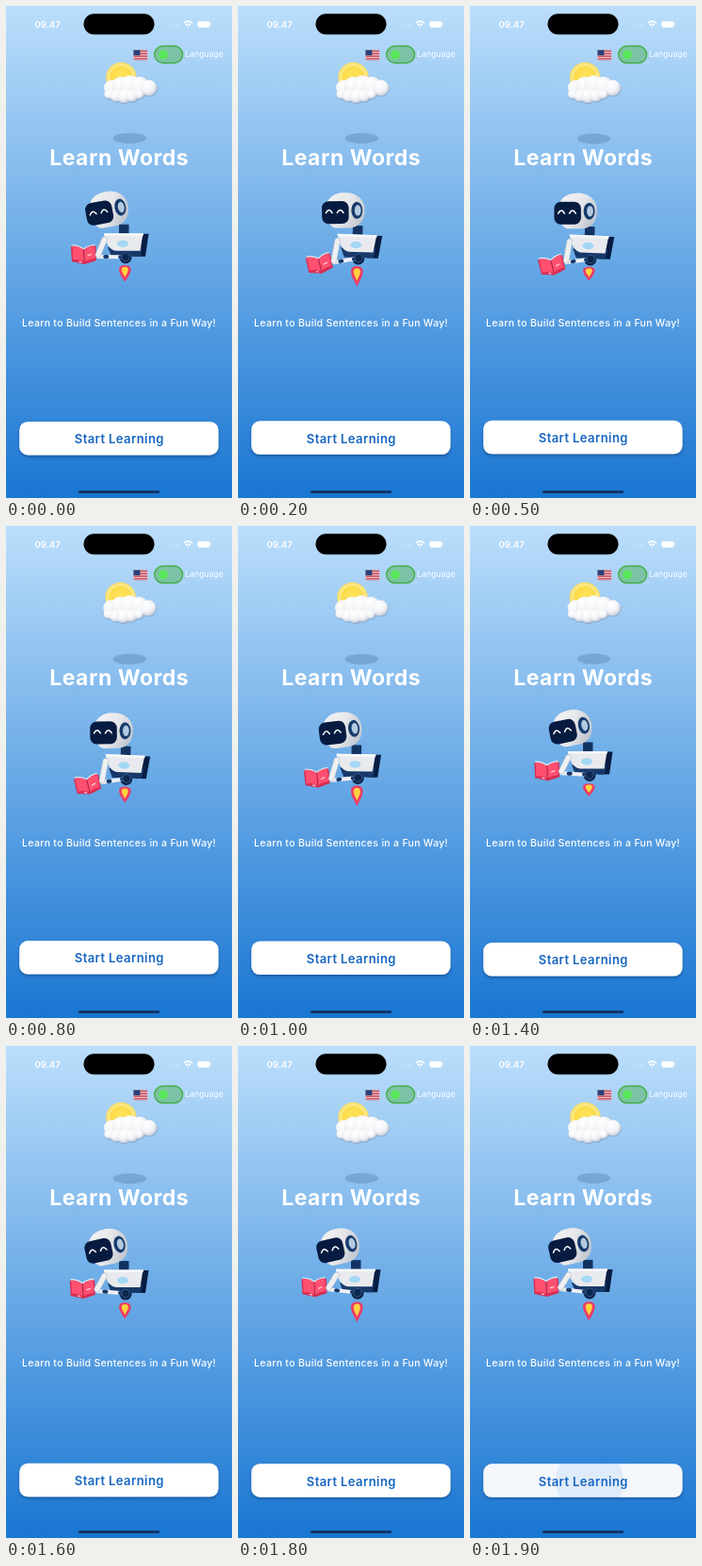
Animation, 240 px wide and 522 px high, one loop 2000 ms. Source, as an HTML page:

```html
<!DOCTYPE html>
<html lang="en">
<head>
<meta charset="utf-8">
<title>Learn Words</title>
<style>
html, body { margin: 0; width: 100%; height: 100%; overflow: hidden; background: #6aaae6; }
svg { display: block; width: 100vw; height: 100vh; }
text { font-family: Inter, Roboto, sans-serif; fill: #fff; }
.mid { text-anchor: middle; }
</style>
</head>
<body>
<svg viewBox="0 0 240 522" preserveAspectRatio="none">
  <defs>
    <linearGradient id="sky" x2="0" y2="1">
      <stop stop-color="#bbdefb"/><stop offset="1" stop-color="#1976d2"/>
    </linearGradient>
    <radialGradient id="sunFill">
      <stop stop-color="#ffe35c"/><stop offset=".72" stop-color="#fbdc4a"/>
      <stop offset=".8" stop-color="#fdea8c"/><stop offset="1" stop-color="#f8dc62"/>
    </radialGradient>
    <radialGradient id="puff" cx=".4" cy=".3" r=".78">
      <stop stop-color="#fff"/><stop offset=".55" stop-color="#f3f4f7"/><stop offset="1" stop-color="#b9c0cc"/>
    </radialGradient>
    <linearGradient id="shell" x2="1" y2=".5">
      <stop stop-color="#f4f4f4"/><stop offset=".6" stop-color="#e6e7ea"/><stop offset="1" stop-color="#c3c8d0"/>
    </linearGradient>
    <clipPath id="btnClip"><rect x="14.2" y="441" width="211.4" height="35.5" rx="9"/></clipPath>
    <filter id="soft" x="-10%" y="-40%" width="120%" height="200%">
      <feDropShadow dx="0" dy="1.8" stdDeviation="1.4" flood-color="#06264f" flood-opacity=".42"/>
    </filter>
    <filter id="cloudShade" x="-20%" y="-20%" width="140%" height="150%">
      <feDropShadow dx=".4" dy=".8" stdDeviation=".6" flood-color="#345b88" flood-opacity=".4"/>
    </filter>
  </defs>
  <rect width="240" height="522" fill="url(#sky)"/>

  <!-- Status bar -->
  <text x="30.5" y="23" font-size="9.6" font-weight="600">09.47</text>
  <rect x="82.5" y="8.3" width="75" height="22" rx="11"/>
  <path d="M174.5 21h11" stroke="#fff" stroke-width="1.3" stroke-dasharray="1.3 1.8" opacity=".5"/>
  <g fill="none" stroke="#fff" stroke-width="1.5">
    <path d="M188.6 18.2q4.6-3.8 9.2 0M190.4 20.3q2.8-2.2 5.6 0"/>
    <circle cx="193.2" cy="22" r=".5" stroke-width=".8"/>
  </g>
  <rect x="203.5" y="16.2" width="13" height="6.6" rx="2" fill="#fff"/>
  <rect x="217" y="18.3" width="1.1" height="2.4" rx=".5" fill="#fff" opacity=".7"/>

  <!-- Language switch -->
  <g id="flag"></g>
  <rect x="157.7" y="42.5" width="30" height="18" rx="9" fill="#4caf50" fill-opacity=".48" stroke="#42ad42" stroke-width="1.4"/>
  <circle cx="167" cy="51.6" r="5.2" fill="#5ae65c"/>
  <text x="190.5" y="54.4" font-size="8.3" letter-spacing=".18">Language</text>

  <!-- Weather -->
  <g id="weather">
    <circle cx="122" cy="76" r="16.2" fill="url(#sunFill)"/>
    <g id="cloud" fill="url(#puff)" filter="url(#cloudShade)"></g>
  </g>
  <ellipse id="shade" cx="131.3" rx="17.5" ry="5.6" fill="#3d6890" opacity=".3"/>

  <text class="mid" x="120.2" y="169.2" font-size="23" font-weight="700" letter-spacing=".5">Learn Words</text>

  <!-- Robot -->
  <g id="flame">
    <path d="M0 22C-2.4 17-6.3 11-6.3 5.5C-6.3-1.8 6.3-1.8 6.3 5.5C6.3 11 2.4 17 0 22Z" fill="#ef3b64"/>
    <path d="M0 16C-1.5 12.5-3.6 9-3.6 5.7C-3.6 1 3.6 1 3.6 5.7C3.6 9 1.5 12.5 0 16Z" fill="#ffd23f"/>
  </g>
  <g id="body">
    <rect x="120" y="231" width="10.5" height="12" fill="#123362"/>
    <path d="M138 241H151.5L148 265H136Z" fill="#071d42"/>
    <circle cx="127" cy="266" r="6.5" fill="#0b2348"/>
    <path d="M108 255H145L143 265H112Z" fill="#17396a"/>
    <path d="M104 240.5H145.5L142.5 259H117Q107 258 104 240.5Z" fill="#e9eaed"/>
    <path d="M104 240.5H146L145.7 243H104.4Z" fill="#f7f8fa"/>
    <ellipse cx="124" cy="251.5" rx="6" ry="3.7" fill="#a4d8f4"/>
  </g>
  <g id="head">
    <path d="M-17-9C-13-17-5-19 0-19C13-20 23-12 23-1C23 11 16 18.5 6 18.5H-8C-17 18-19 1-17-9Z" fill="url(#shell)"/>
    <rect x="-22.7" y="-10" width="28.5" height="24" rx="7" fill="#071b40"/>
    <path d="M-18.5 2.4q3.4-6 6.8 0M-6.6 2.4q3.4-6 6.8 0" fill="none" stroke="#fff" stroke-width="1.5" stroke-linecap="round"/>
    <ellipse cx="14.5" cy="0" rx="6" ry="9" fill="#173b6c"/>
    <ellipse cx="15.4" cy="0" rx="3.4" ry="5.8" fill="#b4c9df"/>
  </g>
  <g id="book">
    <path d="M-13.5-8L0-4.5L13-8.5L13.5 7L1 11L-12.5 8Z" fill="#d92d52"/>
    <path d="M-12-9Q-5-9 0-5Q5-9 11.5-9.5L12.3 5Q5 5.5 .8 8.8Q-4 5.5-11.4 6Z" fill="#ff5070"/>
    <path d="M-12.5-9.3Q-5-9.3 0-5.4Q5-9.3 12-9.8" fill="none" stroke="#d5f0f5" stroke-width="1.1"/>
    <path d="M0-5L.8 9" stroke="#a71f45"/>
    <path d="M4 2l4.5-1.6M-5 8l3 .8" stroke="#ffd0d8" stroke-width="1.2"/>
  </g>
  <g fill="none" stroke-linecap="round" stroke-linejoin="round">
    <path id="forearm" stroke="#eef0f3" stroke-width="4"/>
    <path id="cuff" stroke="#17396a" stroke-width="4"/>
    <path id="armEdge" stroke="#b3bcc9" stroke-width="6.4"/>
    <path id="arm" stroke="#eeeff1" stroke-width="5.2"/>
  </g>
  <circle id="elbow" r="4.3" fill="#0d274f" stroke="#34598a"/>

  <text class="mid" x="120.1" y="340.2" font-size="10.5" font-weight="500" letter-spacing=".3">Learn to Build Sentences in a Fun Way!</text>

  <!-- Button -->
  <g id="button">
    <rect x="14.2" y="441" width="211.4" height="35.5" rx="9" fill="#fff" filter="url(#soft)"/>
    <g id="press" clip-path="url(#btnClip)" fill="#1565c0">
      <rect x="14" y="441" width="212" height="36" opacity=".045"/>
      <circle id="ripple" cx="127" cy="459" opacity=".09"/>
    </g>
    <text class="mid" x="120.3" y="464.3" font-size="13" font-weight="600" letter-spacing=".42" style="fill:#1565c0">Start Learning</text>
  </g>
  <rect x="77" y="514.2" width="86" height="2.6" rx="1.3" fill="#122c56"/>
</svg>
<script>
const LOOP = 2000, STEP = 100, TAP = 1800;
const $ = id => document.getElementById(id);
const wave = (t, peak, period) => Math.cos(2 * Math.PI * (t - peak) / period);

function smoothstep(a, b, x) {
  const k = Math.min(1, Math.max(0, (x - a) / (b - a)));
  return k * k * (3 - 2 * k);
}

function set(id, attrs) {
  for (const name in attrs) $(id).setAttribute(name, attrs[name]);
}
const place = (id, x, y, extra = "") => set(id, { transform: `translate(${x} ${y}) ${extra}` });

function buildScene() {
  // Two rows of puffs, fullest in the middle
  let cloud = "";
  const row = (x, gap, y, rise, r, grow) => {
    for (let i = 0; i < 5; i++) {
      const s = Math.sin(i * Math.PI / 4);
      cloud += `<circle cx="${x + i * gap}" cy="${y + rise * s}" r="${r + grow * s}"/>`;
    }
  };
  row(112, 9.8, 87, -3, 8.5, 2);
  row(109, 8, 93.5, 2, 5, 2.4);
  $("cloud").innerHTML = cloud;

  let flag = `<rect x="135.5" y="46.8" width="14.7" height="10.4" rx=".7" fill="#f6f0f2"/>`;
  for (let i = 0; i < 7; i++) flag += `<rect x="135.5" y="${46.8 + i * 1.6}" width="14.7" height=".9" fill="#c22f40"/>`;
  $("flag").innerHTML = flag + `<rect x="135.5" y="46.8" width="7" height="5.6" fill="#2b4178"/>`;
}

function draw(t) {
  const bob = wave(t, 550, 2900);           // whole robot, 1 = lowest
  const nod = smoothstep(.45, .75, bob);    // 1 = looking straight, book lowered

  place("weather", .5 * wave(t, 200, 1600), 0);
  set("shade", { cy: 140.8 - .5 * wave(t, 0, LOOP) });

  const dx = 1.2 * nod, dy = 3.6 * bob - .6;
  place("body", dx, dy, `rotate(${2.2 * nod} 127 255)`);
  place("head", 106.8 + .8 * bob + 4.5 * nod, 215.2 + 2.5 * bob, `rotate(${2 * bob + 9 * nod - 11})`);
  place("flame", 126.3, 274 + 2.8 * bob, `scale(1 ${(17.5 + 4 * wave(t, 200, 800)) / 22})`);

  const bx = 82 + 1.2 * bob + 3.5 * nod, by = 260.8 + 6 * bob + 8 * nod;
  place("book", bx, by, `rotate(${-10 * nod})`);

  const hx = bx + 15.5, hy = Math.min(by + 1, 270);
  const ex = 127 + dx, ey = 265.5 + dy;
  const at = k => `${hx + (ex - hx) * k} ${hy + 2 + (ey - hy - 2) * k}`;
  const arm = `M${104.5 + dx} ${247 + dy}L${hx} ${hy}`;
  set("forearm", { d: `M${at(0)}L${at(1)}` });
  set("cuff", { d: `M${at(.25)}L${at(.32)}M${at(.8)}L${at(1)}` });
  set("armEdge", { d: arm });
  set("arm", { d: arm });
  set("elbow", { cx: ex, cy: ey });

  place("button", 0, .6 - 1.8 * bob);
  set("press", { visibility: t > TAP ? "visible" : "hidden" });
  set("ripple", { r: Math.max(0, t - TAP) * .36 });
}

buildScene();
const start = performance.now();
function tick(now) {
  const t = Math.max(0, now - start) % LOOP;
  draw(Math.floor(t / STEP) * STEP);
  requestAnimationFrame(tick);
}
draw(0);
requestAnimationFrame(tick);
</script>
</body>
</html>
```
